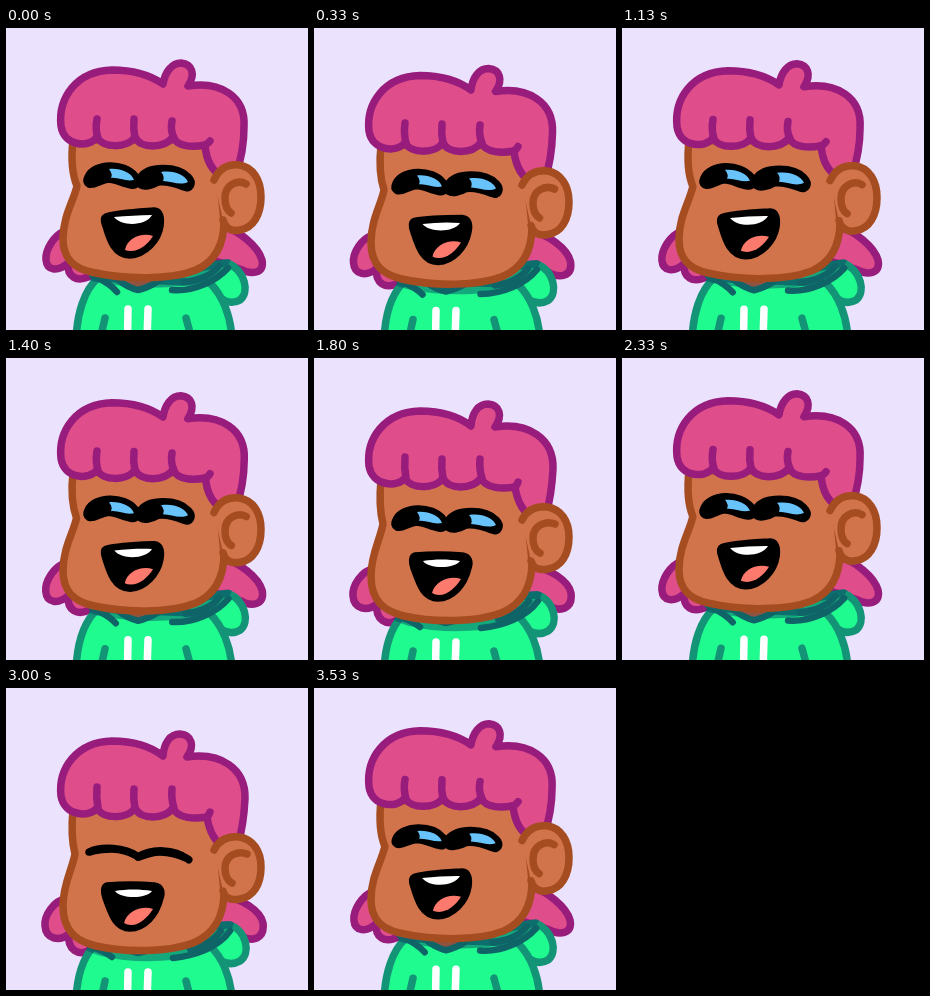
Animation of 302 by 302 pixels, one loop 3590 ms. Source, as an HTML page:

```html
<!DOCTYPE html>
<html lang="en">
<head>
<meta charset="utf-8">
<title>Laughing character</title>
<style>
  html, body { margin: 0; width: 100%; height: 100%; overflow: hidden; background: #ebe2fd; }
  svg { display: block; width: 100%; height: 100%; }
  path { stroke-width: 7.5; stroke-linecap: round; stroke-linejoin: round; }
  .hair { fill: #df4d8b; stroke: #981c7c; }
  .skin { fill: #d1744c; stroke: #a54d20; }
  .cloth { fill: #20fb90; stroke: #149477; }
  .fold { fill: none; stroke: #0f6468; stroke-width: 6.5; }
  .string { fill: none; stroke: #fff; }
  .ink { fill: #000; stroke: #000; }
  .line { fill: none; }
  .flat { stroke: none; }
  .iris { fill: #69c3fb; stroke: none; }
</style>
</head>
<body>
<!-- d is the raised pose, data-b the lowered pose, data-c the closed eye -->
<svg viewBox="0 0 302 302">
  <defs>
    <clipPath id="clothes">
      <path d="M67 310C69 282 76 260 88 246L208 254C218 266 228 285 228 310Z"
        data-b="M67 310C69 285 75 264 88 250L208 257C218 268 228 287 228 310Z"/>
      <path d="M84 245C100 244 115 246 130 246C170 246 200 232 222 231C244 238 248 267 234 278C220 282 208 270 202 264Z"
        data-b="M84 249C100 247 115 249 130 249C170 249 202 232 224 233C246 240 249 269 234 279C220 283 208 273 202 267Z"/>
    </clipPath>
  </defs>

  <path class="hair" d="M59 203C48 207 39 222 40 232C41 243 52 244 62 235C61 248 70 256 86 247L100 205Z"
    data-b="M59 211C48 213 38 227 39 238C40 251 53 254 63 246C61 261 72 270 86 261L100 215Z"/>
  <path class="hair" d="M218 199C232 202 252 218 256 232C259 246 245 247 234 241L200 230Z"
    data-b="M218 209C234 209 255 223 257 235C259 251 246 255 234 247L200 240Z"/>

  <path class="cloth" d="M90 249C104 248 117 248 130 248C170 250 200 236 222 235C239 243 244 264 234 272C222 279 210 268 203 260Z"
    data-b="M90 253C104 251 117 251 130 251C170 252 202 236 224 237C241 243 245 266 234 273C222 280 210 271 203 264Z"/>
  <path class="cloth" d="M70 312C71 286 78 262 92 250L204 255C216 267 225 287 226 312Z"
    data-b="M70 312C71 288 77 267 92 254L204 258C216 269 225 289 226 312Z"/>
  <path class="cloth line" d="M99 290L94 312M180 290L186 312" data-b="M99 293L95 312M180 293L185 312"/>
  <g clip-path="url(#clothes)">
    <path class="flat" fill="#063c62" opacity=".43" d="M60 230C70 247 78 252 95 255C130 261 170 261 192 255C212 250 224 240 229 222L200 180Z"
      data-b="M60 242C70 257 78 263 95 268C127 276 168 274 192 267C214 259 226 248 230 228L200 190Z"/>
  </g>
  <path class="flat" fill="#8f5340" d="M108 242L160 242Q146 258 132 260Q118 258 108 242Z"
    data-b="M108 245L160 245Q146 261 132 263Q118 261 108 245Z"/>
  <path class="fold" d="M86 247C94 251 104 255 111 264M111 251Q122 260 132 262Q142 260 154 252M166 262C188 264 210 253 222 240M178 254C194 252 206 247 213 238"
    data-b="M86 259C94 262 100 264 106 269M111 256Q122 263 132 265Q142 263 154 257M167 270C188 268 212 260 224 243M184 261C198 258 208 252 215 243"/>
  <path class="string" d="M122 281L121.500 312M142 281L141 312" data-b="M122 284L121.500 312M142 284L141 312"/>

  <path class="skin" d="M67 112C65 130 66 146 71 158C68 172 57 188 57 211C57 231 68 240 85 244C120 252 165 252 190 242C208 234 218 218 218 193L210 112Z"
    data-b="M67 122C65 142 66 154 69 166C66 182 57 196 57 218C57 243 70 253 90 258C122 265 163 264 187 255C207 247 218 229 218 204L210 122Z"/>

  <path class="hair" d="M91 109C84 120 58 119 55 98C52 70 70 43 106 42C126 42 144 47 157 56C159 44 166 35 175 35C186 36 190 46 182 58C214 53 240 68 238 99C238 118 235 132 230 146L218 150C205 143 200 132 199 117C189 119 172 120 167 109C158 121 134 121 129 109C121 121 96 120 91 109Z"
    data-b="M91 120C84 130 58 128 55 108C52 81 70 54 106 53C126 53 144 58 157 68C158 55 164 46 174 46C186 47 189 58 181 69C214 64 240 80 239 111C238 130 236 143 232 156L220 161C208 154 203 142 201 129C189 131 172 131 167 120C158 132 134 132 129 120C121 132 96 131 91 120Z"/>
  <path class="hair line" d="M91 91Q89 101 92 110M128 91Q127 101 129 110M166 93Q164 102 168 110M199 117Q202 116 204 113"
    data-b="M91 99Q90 110 92 120M128 101Q127 111 129 120M166 101Q165 111 168 120M201 129Q203 127 204 124"/>

  <path class="skin" d="M208 152C213 141 222 136 233 137C247 139 255 152 255 169C255 187 247 200 234 202C225 204 219 200 217 192"
    data-b="M208 162C213 152 222 148 233 149C247 151 255 163 255 179C255 197 247 209 234 211C225 213 219 210 217 203"/>
  <path class="skin line" d="M240 156C231 151 219 157 219 170C219 178 222 183 225 185"
    data-b="M241 166C231 162 219 168 219 180C219 188 222 193 226 195"/>

  <g id="eyes">
    <path class="ink" d="M82 149C88 135 118 134 129 148C133 153 130 158 125 157C117 156 110 151 102 151C94 152 88 158 83 156C80 154 81 151 82 149Z"
      data-c="M83 151C95 145 119 146 131 155C132 156 132 156 131 155C124 151 116 148 106 148C96 148 90 149 84 151C83 151 83 151 83 151Z"/>
    <path class="ink" d="M134 150C142 137 172 138 182 149C188 155 184 162 178 159C168 155 160 153 152 154C145 158 138 159 135 157C131 155 132 152 134 150Z"
      data-c="M132 156C146 147 168 148 182 158C183 159 183 159 182 158C172 153 163 151 154 151C146 151 138 154 133 156C132 156 132 156 132 156Z"/>
    <path class="iris" d="M103 141C114 140 125 144 128 152C120 154 112 149 105 150Q107 146 103 141Z"
      data-c="M106 149C114 149 122 150 126 153C122 150 114 149 106 149Q106 149 106 149Z"/>
    <path class="iris" d="M155 144C168 142 179 147 182 154C174 158 165 153 157 153Q159 148 155 144Z"
      data-c="M156 150C166 150 175 153 179 156C175 153 166 150 156 150Q156 150 156 150Z"/>
  </g>

  <path class="ink" d="M100 189C112 185 135 184 148 183C154 183 155 190 154 198C152 212 139 226 124 227C109 227 104 212 100 198C98 193 98 190 100 189Z"
    data-b="M101 198C114 197 136 197 148 198C155 199 156 204 154 210C150 227 138 240 124 240C109 240 105 223 100 210C98 204 98 199 101 198Z"/>
  <path class="flat" fill="#fff" d="M108 189C121 188 133 187 146 187C140 198 116 199 108 189Z"
    data-b="M109 203C121 201 134 201 146 203C140 211 115 211 109 203Z"/>
  <path class="flat" fill="#fc796d" d="M119 222C121 210 136 204 147 208C142 216 134 223 125 223Q121 223 119 222Z"
    data-b="M118 235C121 223 136 217 147 221C142 229 134 237 125 237Q121 237 118 235Z"/>
</svg>
<script>
const LOOP = 3590;
const number = /-?\d+(\.\d+)?/g;
const values = d => d.match(number).map(Number);

const parts = [...document.querySelectorAll('[data-b], [data-c]')].map(el => {
  const d = el.getAttribute('d');
  return { el, d, from: values(d), to: values(el.dataset.b || el.dataset.c), lid: 'c' in el.dataset };
});
const eyes = document.getElementById('eyes');

function morph({ el, d, from, to }, amount) {
  let i = 0;
  el.setAttribute('d', d.replace(number, () => {
    const v = from[i] + (to[i] - from[i]) * amount;
    i++;
    return v.toFixed(2);
  }));
}

// Drawn at ten poses a second, held alternately for 130 and 70 ms.
const poseAt = t => Math.floor(t / 200) * 2 + (t % 200 >= 130 ? 1 : 0);

let shown = -1;
function draw(pose) {
  const drop = (1 - Math.cos(pose * Math.PI / 6)) / 2;
  const blink = pose > 24 ? drop ** 0.75 : 0;
  for (const part of parts) morph(part, part.lid ? blink : drop);
  eyes.setAttribute('transform', `translate(0 ${(13 * drop).toFixed(2)})`);
}

const start = performance.now();
function tick() {
  const pose = poseAt((performance.now() - start) % LOOP);
  if (pose !== shown) draw(shown = pose);
  requestAnimationFrame(tick);
}
tick();
</script>
</body>
</html>
```
